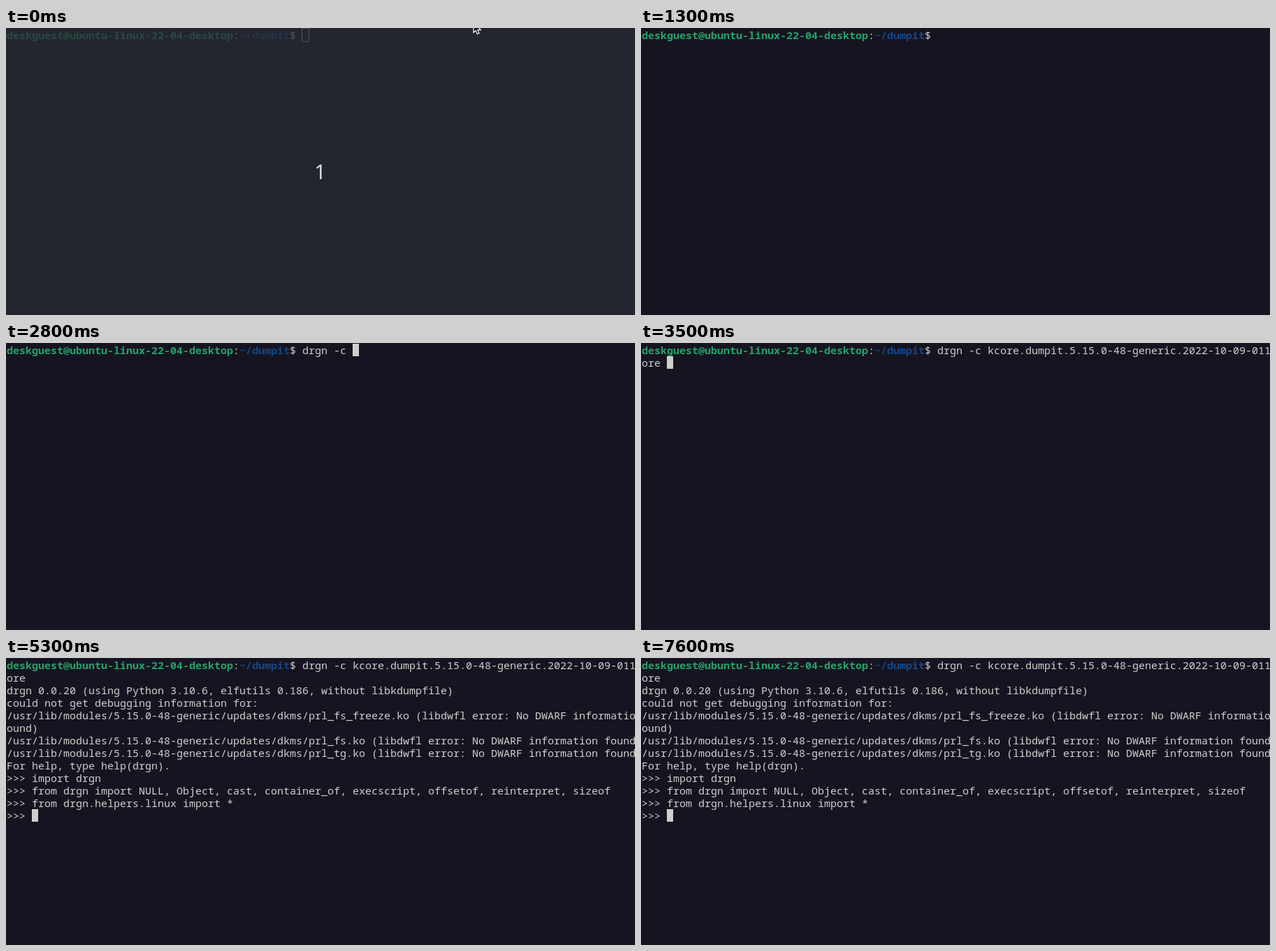
These frames come from a looping animation (900 px wide and 412 px high, 8000 ms). An HTML page with a canvas:

```html
<!DOCTYPE html>
<html lang="en">
<head>
<meta charset="utf-8">
<title>Terminal session</title>
<style>
  html, body { margin: 0; width: 100%; height: 100%; overflow: hidden; background: #171421; }
  canvas { display: block; width: 900px; height: 412px; }
</style>
</head>
<body>
<canvas id="stage" width="900" height="412"></canvas>
<script>
const ctx = document.getElementById('stage').getContext('2d', { alpha: false });
const W = 900, H = 412, LOOP = 8000;
const CELL = 9, LINE = 18, PAD = 1;
const BG = '#171421', FG = '#d0cfcc', GREEN = '#26a269', BLUE = '#12488b';
const MONO = '15px "Noto Sans Mono", "DejaVu Sans Mono", monospace';

const PROMPT = [
  ['deskguest@ubuntu-linux-22-04-desktop', GREEN, true],
  [':', FG, false],
  ['~/dumpit', BLUE, true],
  ['$', FG, false]
];
const CMD_COL = 47;
const COMMAND = 'drgn -c kcore.dumpit.5.15.0-48-generic.2022-10-09-011';
const BANNER = 'drgn 0.0.20 (using Python 3.10.6, elfutils 0.186, without libkdumpfile)';
const MODULES = '/usr/lib/modules/5.15.0-48-generic/updates/dkms/';
const OUTPUT = [
  'could not get debugging information for:',
  MODULES + 'prl_fs_freeze.ko (libdwfl error: No DWARF informatio',
  'ound)',
  MODULES + 'prl_fs.ko (libdwfl error: No DWARF information found',
  MODULES + 'prl_tg.ko (libdwfl error: No DWARF information found',
  'For help, type help(drgn).',
  '>>> import drgn',
  '>>> from drgn import NULL, Object, cast, container_of, execscript, offsetof, reinterpret, sizeof',
  '>>> from drgn.helpers.linux import *',
  '>>>'
];

const COUNTDOWN_END = 100, POINTER_END = 400, FOCUS = 800;
const COMPLETE = 3500, ENTER = 4100, START = 4200, READY = 4500;
// [time, characters typed so far]
const KEYS = [[1500, 1], [1700, 2], [2000, 3], [2300, 4], [2400, 5], [2700, 6], [2800, 8], [3200, 10]];
const BLINKS = [1300, 1500, 4700, 5300, 5900, 6500, 7100, 7600];

const colX = col => PAD + col * CELL;
const rowY = row => PAD + row * LINE;

function print(text, col, row, color = FG, bold = false) {
  ctx.font = (bold ? 'bold ' : '') + MONO;
  ctx.fillStyle = color;
  ctx.fillText(text, colX(col), rowY(row) + 15);
}

function drawPrompt() {
  let col = 0;
  for (const [text, color, bold] of PROMPT) {
    print(text, col, 0, color, bold);
    col += text.length;
  }
}

function typedCount(t) {
  if (t >= COMPLETE) return COMMAND.length;
  return KEYS.reduce((n, [at, count]) => t >= at ? count : n, 0);
}

function cursorCell(t) {
  if (t >= READY) return [4, 12];
  if (t >= START) return [0, 3];
  if (t >= ENTER) return [0, 2];
  if (t >= COMPLETE) return [4, 1];
  return [CMD_COL + typedCount(t), 0];
}

function drawCursor(t) {
  const [col, row] = cursorCell(t);
  const x = colX(col), y = rowY(row);
  if (t < FOCUS) {
    ctx.strokeStyle = FG;
    ctx.lineWidth = 1;
    ctx.strokeRect(x - 0.5, y - 0.5, CELL + 1, LINE + 1);
  } else if (BLINKS.filter(at => t >= at).length % 2 === 0) {
    ctx.fillStyle = FG;
    ctx.fillRect(x, y, CELL, LINE);
  }
}

function drawCountdown() {
  ctx.fillStyle = 'rgba(40, 45, 52, 0.75)';
  ctx.fillRect(0, 0, W, H);
  ctx.font = '29px "Noto Sans", "Open Sans", sans-serif';
  ctx.fillStyle = '#dcdddd';
  ctx.textAlign = 'center';
  ctx.fillText('1', 449.5, 217);
  ctx.textAlign = 'left';
}

function drawPointer(y) {
  const points = [[0, 0], [0, 14.5], [3.2, 11.7], [5.4, 16.6], [8, 15.4], [5.9, 10.7], [10.3, 10.7]];
  ctx.beginPath();
  points.forEach(([px, py]) => ctx.lineTo(669 + px, y + py));
  ctx.closePath();
  ctx.fillStyle = '#111';
  ctx.fill();
  ctx.strokeStyle = '#fff';
  ctx.lineWidth = 1.2;
  ctx.stroke();
}

function draw(t) {
  ctx.fillStyle = BG;
  ctx.fillRect(0, 0, W, H);
  drawPrompt();
  print(COMMAND.slice(0, typedCount(t)), CMD_COL, 0);
  if (t >= COMPLETE) print('ore', 0, 1);
  if (t >= START) print(BANNER, 0, 2);
  if (t >= READY) OUTPUT.forEach((text, i) => print(text, 0, i + 3));
  drawCursor(t);
  if (t < COUNTDOWN_END) drawCountdown();
  if (t < POINTER_END) drawPointer(t < COUNTDOWN_END ? -8 : -3.5);
}

const start = performance.now();
function tick() {
  draw((performance.now() - start) % LOOP);
  requestAnimationFrame(tick);
}
tick();
</script>
</body>
</html>
```
